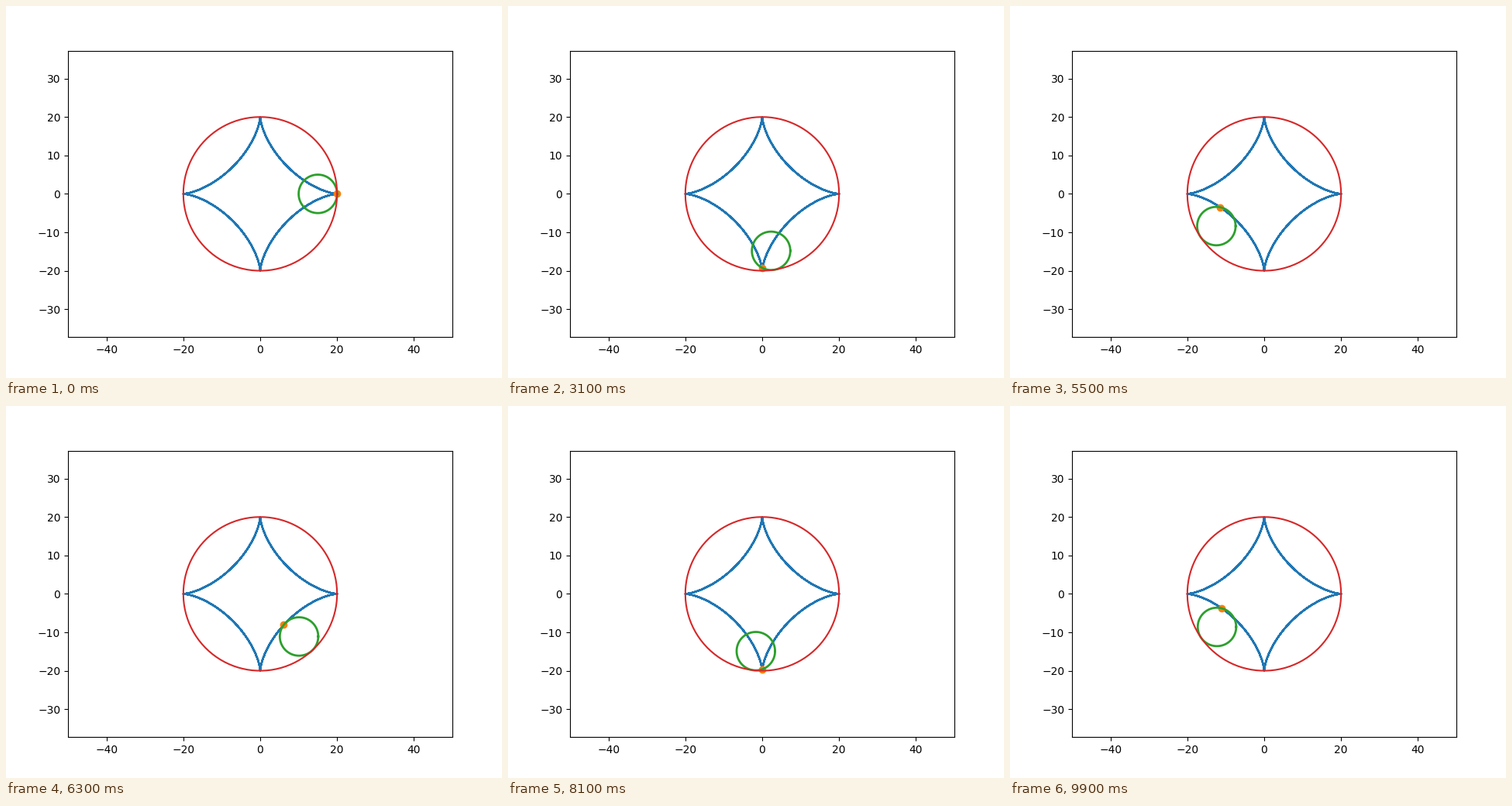
Animation of 640 by 480 pixels, one loop 10000 ms. Source, as a matplotlib script:

```python
import numpy as np
import matplotlib.pyplot as plt
from matplotlib.animation import FuncAnimation

R, r = 20, 5
FRAMES, INTERVAL = 100, 100


def center(t):
    return (R - r) * np.cos(t), (R - r) * np.sin(t)


def hypocycloid(t):
    cx, cy = center(t)
    k = (R - r) / r
    return cx + r * np.cos(k * t), cy - r * np.sin(k * t)


def circle(radius, cx=0, cy=0):
    a = np.linspace(0, 2 * np.pi, 200)
    return cx + radius * np.cos(a), cy + radius * np.sin(a)


fig, ax = plt.subplots(figsize=(6.4, 4.8), dpi=100)
ax.set_aspect("equal", adjustable="datalim")
ax.set_xlim(-50, 50)
ax.set_ylim(-37.258, 37.258)

# The curve is traced over many turns, which hardens its edges.
ax.plot(*hypocycloid(np.arange(0, 100, 0.1)), color="C0")
dot, = ax.plot([], [], "o", color="C1")
wheel, = ax.plot([], [], color="C2", lw=2)
ax.plot(*circle(R), color="C3")


def update(i):
    t = max(i - 1, 0)  # one radian per step, after a one-step hold
    x, y = hypocycloid(t)
    dot.set_data([x], [y])
    wheel.set_data(*circle(r, *center(t)))
    return dot, wheel


anim = FuncAnimation(fig, update, frames=FRAMES, interval=INTERVAL,
                     repeat=True, repeat_delay=0)
plt.show()
```
